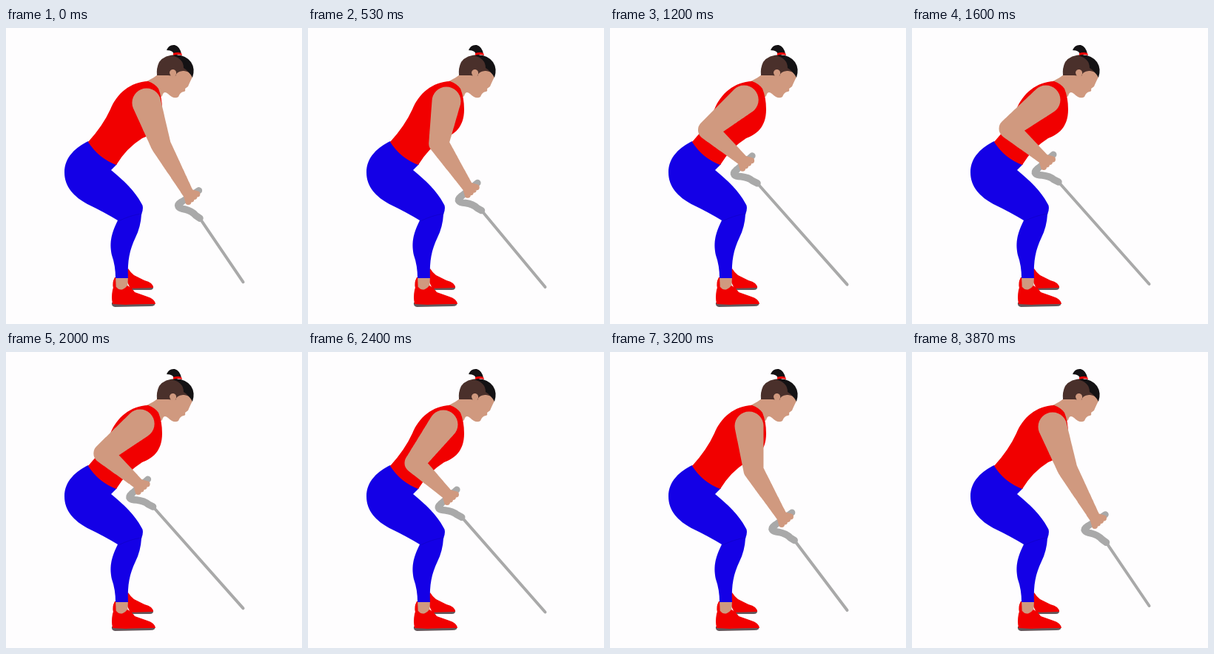
These frames come from a looping animation (400x400 px, 3940 ms). An HTML page with a canvas:

```html
<!DOCTYPE html>
<html lang="en">
<head>
<meta charset="utf-8">
<title>Cable row</title>
<style>
html, body { margin: 0; width: 100%; height: 100%; overflow: hidden; background: #fefdfe; }
canvas { display: block; }
</style>
</head>
<body>
<canvas id="stage" width="400" height="400"></canvas>
<script>
const ctx = document.getElementById('stage').getContext('2d');
const LOOP = 3940, STEP = 200 / 3;
const RED = '#f10000', BLUE = '#1400e6', SKIN = '#d0997f', GREY = '#a9a9a9', SOLE = '#62585c';

const body = [
  // far shoe
  [SOLE, 'M168 349 L199 349 Q200 354 194 354 L168 354Z'],
  [RED, 'M165 325 Q168 330 173 334 L187 341 Q199 344 199 351 L168 352 L160 335Z M147 337 Q143 344 145 352 L151 350 L150 337Z'],
  // near leg and shoe
  [SKIN, 'M148 335 L165 335 L164 357 L149 357Z'],
  [SOLE, 'M143 371 L201 371 Q203 376 195 376 L147 377 Q142 376 143 371Z'],
  [RED, 'M144 354 Q145 349 149 350 Q153 355 158 353 Q162 351 164 348 Q170 351 174 357 L191 363 Q201 366 202 373 Q173 373 162 374 L144 373 Q142 364 144 354Z'],
  [BLUE, 'M111 153 C95 161 79 174 79 195 C79 215 92 228 110 238 Q133 249 151 260 C141 280 140 292 143 307 Q148 321 148 338 L165 338 C164 314 167 300 175 283 Q182 269 183 252 Q187 242 183 237 C174 220 160 207 142 192 L150 184Z'],
  // head and neck
  [SKIN, 'M207 60 Q203 67 185 74 L205 96 L211 92 Q213 84 219 89 Q227 97 233 93 Q235 87 240 86 Q243 86 242 82 L246 79 Q248 74 252 66 L241 50 L215 48Z'],
  ['#4a302b', 'M204 64 Q203 54 207 46 Q214 36 231 36 L247 51 Q250 56 252 64 Q245 57 239 58 Q230 59 229 65 L219 64Z'],
  ['#141214', 'M224 37 Q241 34 250 46 Q256 55 252 67 Q247 58 240 54 Q240 41 224 37Z M217 30 Q220 22 228 23 Q235 25 237 35 L227 37 Q227 30 217 30Z'],
  [RED, 'M226 34 Q232 32 237 34 L238 37 Q231 35 226 37Z'],
  [SKIN, 'M221 60 C222 54 231 55 230 62 C229 68 222 68 221 60Z'],
  // vest
  [RED, 'M111 154 Q131 132 141 110 C150 88 168 73 192 72 Q201 75 206 82 Q211 94 211 110 C211 135 197 144 184 149 Q163 162 149 185 Q125 176 111 154Z']
].map(([color, d]) => [color, new Path2D(d)]);

const kneeFold = new Path2D('M183 251 Q168 253 152 261');
const grip = new Path2D('M10 -9 L-11 10');
const hook = new Path2D('M-11 10 C-18 16 -14 19 -5 19 Q5 20 11 25 L17 28');

// pull amount, shoulder, elbow, fist, height of the cable end
const poses = [
  [0, 190, 101, 210, 158, 250, 227, 343],
  [.22, 188, 100, 194, 160, 235, 225, 349],
  [.40, 187, 99, 177, 156, 219, 218, 350],
  [.825, 183, 98, 144, 150, 191, 195, 351.5],
  [1, 181, 97, 131, 136, 181, 180, 346]
];

const ease = x => .5 - .5 * Math.cos(Math.PI * Math.min(1, Math.max(0, x)));

function pull(t) {
  return t < 1600 ? ease((t + 86) / 1413) : 1 - ease((t - 1870) / 1930);
}

function slope(i, k) {
  const a = poses[Math.max(0, i - 1)], b = poses[Math.min(poses.length - 1, i + 1)];
  return (b[k] - a[k]) / (b[0] - a[0]);
}

// cubic through the poses
function poseAt(p) {
  let i = 0;
  while (i < poses.length - 2 && p > poses[i + 1][0]) i++;
  const a = poses[i], b = poses[i + 1], h = b[0] - a[0], u = (p - a[0]) / h, v = 1 - u;
  return a.map((_, k) =>
    v * v * (1 + 2 * u) * a[k] + u * u * (3 - 2 * u) * b[k] +
    u * v * h * (v * slope(i, k) - u * slope(i + 1, k)));
}

function stroke(path, width, color) {
  ctx.lineWidth = width;
  ctx.strokeStyle = color;
  ctx.stroke(path);
}

// adds a limb whose radius runs from r0 to r1
function limb(path, x0, y0, r0, x1, y1, r1) {
  for (let i = 0; i <= 60; i++) {
    const u = i / 60, r = r0 + (r1 - r0) * u;
    const x = x0 + (x1 - x0) * u, y = y0 + (y1 - y0) * u;
    path.moveTo(x + r, y);
    path.arc(x, y, r, 0, 7);
  }
}

function drawArm([, sx, sy, ex, ey, hx, hy, endY]) {
  const tilt = Math.atan2(endY - hy, 320.5 - hx) - .87;
  ctx.save();
  ctx.translate(hx, hy);
  ctx.rotate(tilt);
  stroke(grip, 9, GREY);
  stroke(hook, 9.5, GREY);
  ctx.restore();

  const c = Math.cos(tilt), s = Math.sin(tilt), cable = new Path2D();
  cable.moveTo(hx + 17 * c - 28 * s, hy + 17 * s + 28 * c);
  cable.lineTo(320.5, endY);
  stroke(cable, 4, GREY);

  const arm = new Path2D();
  limb(arm, sx, sy, 19.5, ex, ey, 13.5);
  limb(arm, ex, ey, 13.5, hx - 3, hy - 3, 7.5);
  for (let i = 0; i < 4; i++) {
    const x = hx - 3 + i * 4, y = hy + 8 - i * 3.5;
    limb(arm, hx - 3, hy - 3, 7, x, y, 4);
  }
  ctx.fillStyle = SKIN;
  ctx.fill(arm);
}

function draw(now) {
  const t = Math.floor((now % LOOP + 4) / STEP) * STEP;
  ctx.fillStyle = '#fefdfe';
  ctx.fillRect(0, 0, 400, 400);
  ctx.lineCap = ctx.lineJoin = 'round';
  for (const [color, path] of body) {
    ctx.fillStyle = color;
    ctx.fill(path);
  }
  stroke(kneeFold, .7, '#1000c4');
  drawArm(poseAt(pull(t)));
}

const start = performance.now();
function tick() {
  draw(performance.now() - start);
  requestAnimationFrame(tick);
}
tick();
</script>
</body>
</html>
```
